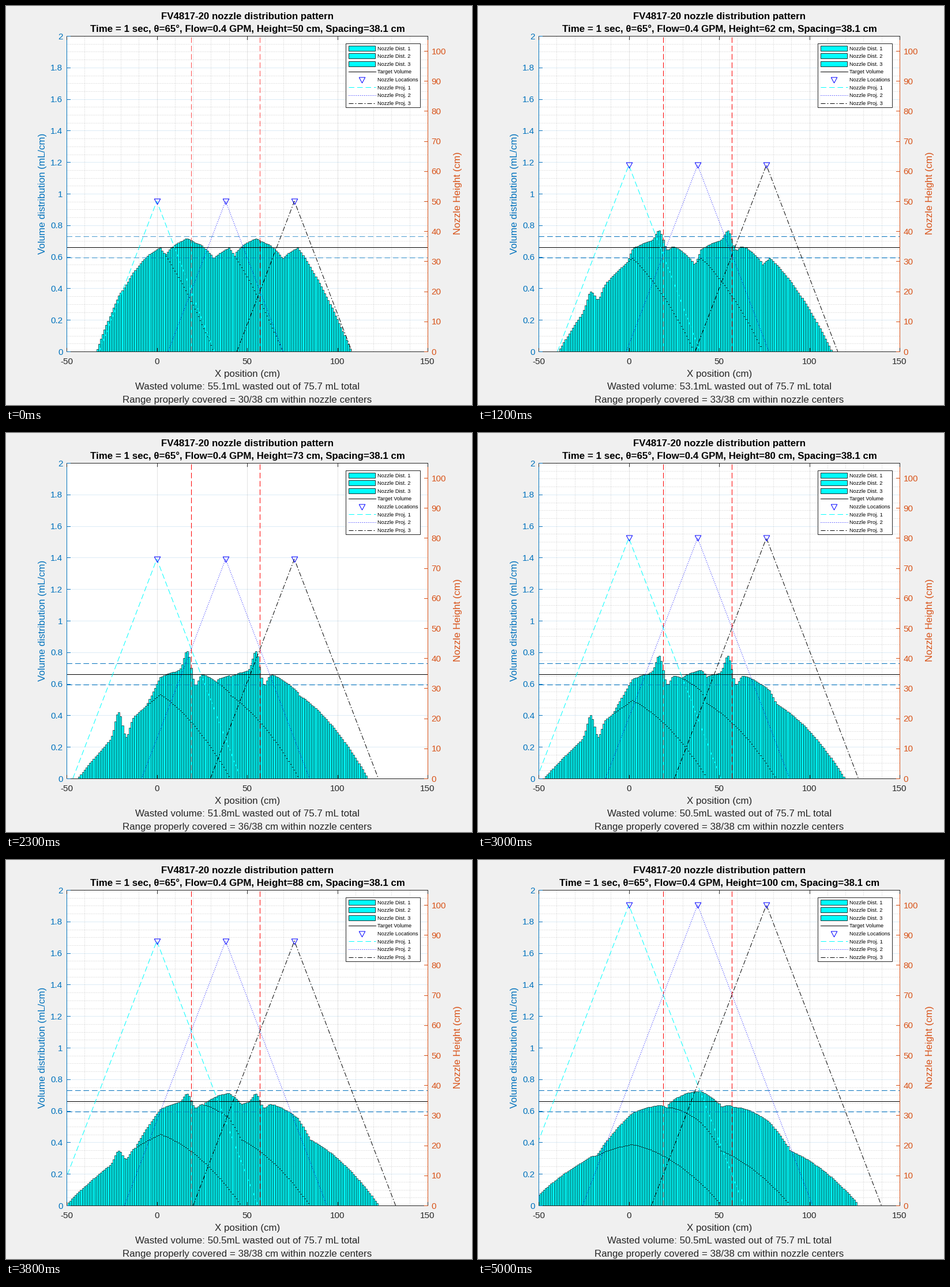
Recreate the animation shown at these times as a matplotlib script. Size 808x693 px, loop 5100 ms.

```python
import math

import matplotlib.pyplot as plt
import numpy as np
from matplotlib.animation import FuncAnimation
from matplotlib.collections import LineCollection, PolyCollection
from matplotlib.patches import Rectangle

W, H, DPI = 808, 693, 64
PT = 72 / DPI  # points per pixel
LEFT, RIGHT, TOP, BOTTOM = 105, 731, 52, 600
X_MIN, X_MAX, Y_MAX, HEIGHT_MAX = -50, 150, 2, 105

BLUE, ORANGE, DARK = "#0072bd", "#d95319", "#262626"
SPACING, ANGLE, VOLUME = 38.1, 65, 75.7
NOZZLES = [i * SPACING for i in range(3)]
TARGET = VOLUME / (3 * SPACING)
BAR_X = np.arange(-52, 132)

plt.rcParams["font.family"] = "Liberation Sans"
plt.rcParams["lines.scale_dashes"] = False


def dash(*pixels):
    return (0, [p * PT for p in pixels])


DASHED = dash(9.5, 5)
DOTTED = dash(1, 2.3)
DASH_DOT = dash(8, 3, 2, 3)
PROJECTIONS = [("cyan", DASHED), ("blue", DOTTED), ("black", DASH_DOT)]


def bell(x, center, width):
    return np.exp(-((x - center) / width) ** 2)


def spray(x, height):
    """Volume of one nozzle: a lopsided dome with a ridge on its left."""
    rise = height - 50
    peak = .657 - .0054 * rise
    left_edge, right_edge = 33.5 + .45 * rise, 31.5 + .4 * rise
    left_bulge = .25 + .0008 * (height - 75) ** 2
    right_bulge = .25 + .009 * rise

    d = x - 2
    s = np.where(d < 0, -d / (left_edge + 2), d / (right_edge - 2))
    bulge = np.where(d < 0, left_bulge, right_bulge)
    ridge = .13 * bell(height, 74, 15)
    volume = (peak * (1 - s) * (1 + bulge * s)
              + ridge * (bell(x, -21.3, 2.6) - .7 * bell(x, -17, 2.4)))
    return np.where((s < 1) & (volume > .01), volume, 0)


def bar_stacks(height):
    base = np.zeros(len(BAR_X))
    for center in NOZZLES:
        top = base + spray(BAR_X - center, height)
        yield [[(x - .5, b), (x - .5, t), (x + .5, t), (x + .5, b)]
               for x, b, t in zip(BAR_X, base, top) if t > b]
        base = top


def to_volume(height):
    return height * Y_MAX / HEIGHT_MAX


def px_x(x):
    return LEFT + (x - X_MIN) / (X_MAX - X_MIN) * (RIGHT - LEFT)


def px_y(y):
    return BOTTOM - y / Y_MAX * (BOTTOM - TOP)


fig = plt.figure(figsize=(W / DPI, H / DPI), dpi=DPI, facecolor="#f0f0f0")

# Plot area in data units
ax = fig.add_axes([LEFT / W, 1 - BOTTOM / H,
                   (RIGHT - LEFT) / W, (BOTTOM - TOP) / H])
ax.set(xlim=(X_MIN, X_MAX), ylim=(0, Y_MAX), xticks=[], yticks=[])
for spine in ax.spines.values():
    spine.set_visible(False)

# Page layer in pixels
page = fig.add_axes([0, 0, 1, 1], zorder=5)
page.set(xlim=(0, W), ylim=(H, 0))
page.axis("off")


def write(x, y, text, size=16.85, color=DARK, ha="center", **style):
    return page.text(x, y, text, fontsize=size * PT, color=color, ha=ha,
                     va="baseline", **style)


def stroke(xs, ys, color=DARK, width=1, style="-"):
    page.plot(xs, ys, color=color, lw=width * PT, ls=style)


def grid(xs, ys, x_color, y_color, alpha, style="-"):
    sets = [([[(x, 0), (x, Y_MAX)] for x in xs], x_color),
            ([[(X_MIN, y), (X_MAX, y)] for y in ys], y_color)]
    return [ax.add_collection(LineCollection(
        lines, colors=color, alpha=alpha, linewidths=.9 * PT,
        linestyles=[style], zorder=1), autolim=False)
        for lines, color in sets]


def triangle(axes, xs, ys):
    marker = [(-1, .85), (1, .85), (0, -1), (-1, .85)]
    return axes.plot(xs, ys, ls="none", marker=marker, ms=10.5 * PT,
                     mfc="none", mec="blue", mew=1 * PT, zorder=8)[0]


def draw_frame():
    stroke([LEFT, RIGHT], [TOP, TOP])
    stroke([LEFT, RIGHT], [BOTTOM, BOTTOM])
    stroke([LEFT, LEFT], [TOP, BOTTOM], BLUE)
    stroke([RIGHT, RIGHT], [TOP, BOTTOM], ORANGE)
    for v in range(X_MIN, X_MAX + 1, 50):
        x = px_x(v)
        stroke([x, x], [BOTTOM, BOTTOM - 6])
        stroke([x, x], [TOP, TOP + 6])
        write(x, 622, str(v), 15.3)
    for i in range(11):
        y = px_y(i / 5)
        stroke([LEFT, LEFT + 6], [y, y], BLUE)
        write(98.5, y + 5.5, f"{i / 5:g}", 15.3, BLUE, "right")
    for v in range(0, 101, 10):
        y = px_y(to_volume(v))
        stroke([RIGHT - 6, RIGHT], [y, y], ORANGE)
        write(737.5, y + 5.5, str(v), 15.3, ORANGE, "left")


def draw_legend():
    page.add_patch(Rectangle((589, 65), 129, 111, fc="white", ec=DARK,
                             lw=PT, zorder=1.5))
    names = [f"Nozzle Dist. {i}" for i in (1, 2, 3)]
    names += ["Target Volume", "Nozzle Locations"]
    names += [f"Nozzle Proj. {i}" for i in (1, 2, 3)]
    for row, name in enumerate(names):
        y = 73.3 + 13.6 * row
        write(643.5, y + 3.3, name, 9.2, "black", "left")
        if row < 3:
            page.add_patch(Rectangle((594, y - 4.5), 46, 9, fc="cyan",
                                     ec="black", lw=.8 * PT, zorder=2))
        elif row == 3:
            stroke([594, 641], [y, y], "black")
        elif row == 4:
            triangle(page, [617], [y + .5])
        else:
            color, style = PROJECTIONS[row - 5]
            stroke([594, 641], [y, y], color, 1, style)


def guides(zorder, alpha):
    style = dict(lw=PT, ls=DASHED, alpha=alpha, zorder=zorder)
    reds = [ax.axvline(SPACING * k, color="red", **style) for k in (.5, 1.5)]
    blues = [ax.axhline(TARGET * k, color=BLUE, **style) for k in (.9, 1.1)]
    return reds + blues


draw_frame()
draw_legend()
grid(range(0, 150, 50), np.arange(1, 10) / 5, DARK, BLUE, .15)
minor_grid = grid([x for x in range(-40, 150, 10) if x % 50],
                  [i / 20 for i in range(1, 40) if i % 4],
                  "#1a1a1a", "#1a1a1a", .25, dash(1, 2))

# Translucent guides pile up behind the bars; one fresh set lies in front.
old_guides = guides(2, 0)
guides(4, .7)
ax.axhline(TARGET, color="black", lw=PT, zorder=5)

bars = [ax.add_collection(PolyCollection(
    [], facecolors="cyan", edgecolors="black", linewidths=.6 * PT,
    zorder=3), autolim=False) for _ in NOZZLES]
cones = [ax.plot([], [], color=color, ls=style, lw=PT, zorder=6)[0]
         for color, style in PROJECTIONS]
heads = triangle(ax, [], [])

MID = (LEFT + RIGHT + 1) / 2
write(MID, 22.5, "FV4817-20 nozzle distribution pattern", color="black",
      weight="bold")
title = write(MID, 44.7, "", color="black", weight="bold")
write(MID, 644, "X position (cm)")
wasted_text = write(MID, 666.5, "")
covered_text = write(MID, 688.7, "")
for x, label, color in ((68, "Volume distribution (mL/cm)", BLUE),
                        (788, "Nozzle Height (cm)", ORANGE)):
    write(x, 325.5, label, color=color, rotation=90, rotation_mode="anchor")


def update(n):
    height = 50 + n
    top = to_volume(height)
    reach = height * math.tan(math.radians(ANGLE / 2))

    for line in minor_grid:
        line.set_visible(n % 2 == 0)
    for line in old_guides:
        line.set_alpha(1 - .3 ** n)
    for series, boxes in zip(bars, bar_stacks(height)):
        series.set_verts(boxes)
    for cone, x in zip(cones, NOZZLES):
        cone.set_data([x - reach, x, x + reach], [0, top, 0])
    heads.set_data(NOZZLES, [top] * 3)

    wasted = np.interp(n, [0, 7, 17, 23, 30], [55.1, 53.9, 52.4, 51.8, 50.5])
    covered = min(38, round(30 + .27 * n))
    title.set_text(f"Time = 1 sec, θ={ANGLE}°, Flow=0.4 GPM, "
                   f"Height={height} cm, Spacing={SPACING} cm")
    wasted_text.set_text(f"Wasted volume: {wasted:.1f}mL wasted "
                         f"out of {VOLUME} mL total")
    covered_text.set_text(f"Range properly covered = {covered}/38 cm "
                          "within nozzle centers")


anim = FuncAnimation(fig, update, frames=51, interval=100, repeat=True)
plt.show()
```
